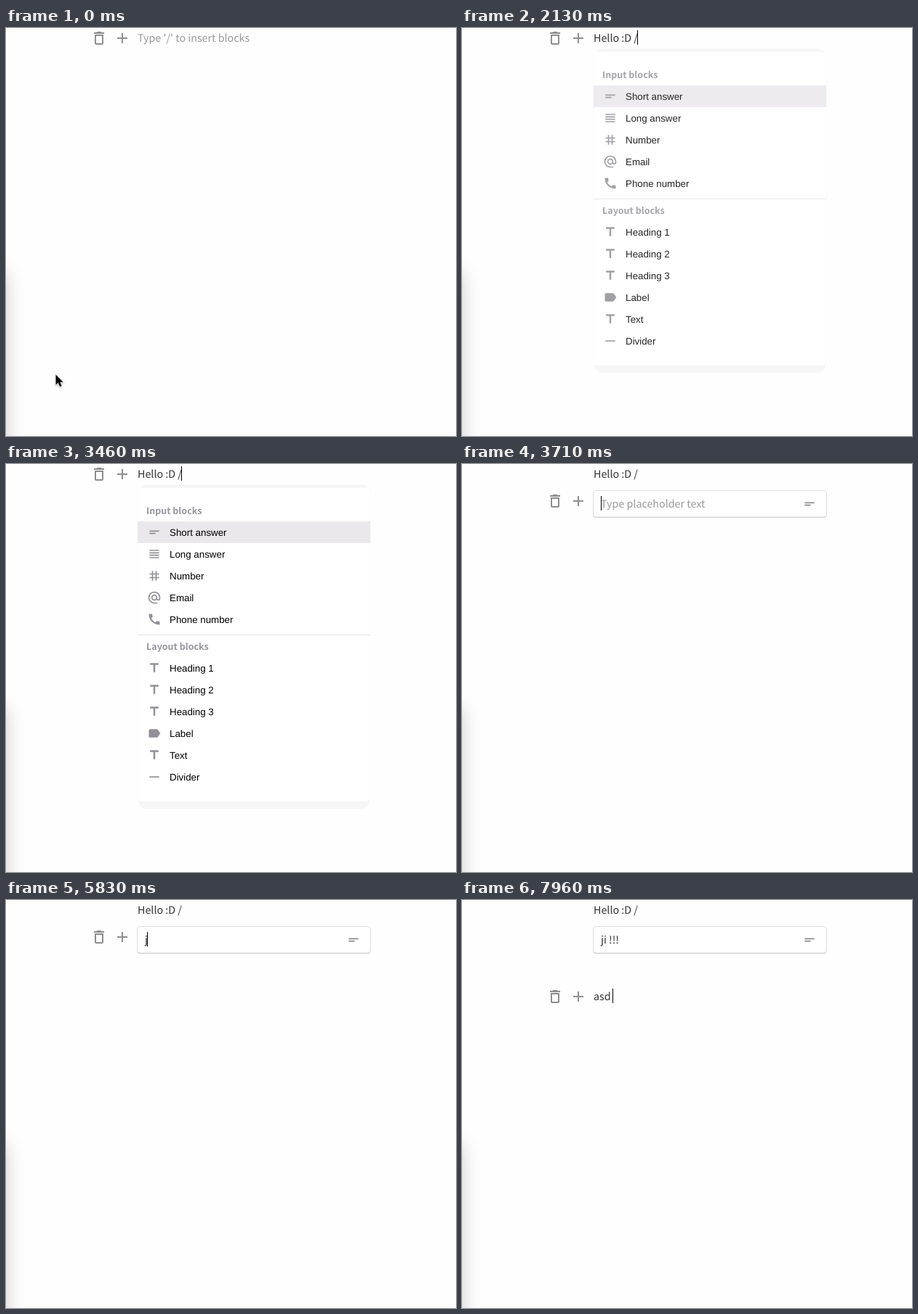
Recreate the animation shown at these times as an HTML page. Size 619x562 px, loop 8 s.

```html
<!DOCTYPE html>
<html lang="en">
<head>
<meta charset="utf-8">
<title>Block editor</title>
<style>
  html, body { margin: 0; width: 100%; height: 100%; overflow: hidden; background: #fefefe; }
  svg { display: block; }
  text { white-space: pre; text-rendering: geometricPrecision; fill: #333; }
  .body, .hint, .head { font: 14.3px "Noto Sans CJK JP", "Noto Sans CJK SC", "Noto Sans CJK", "Open Sans", sans-serif; }
  .hint { fill: #999; }
  .head { font-size: 12.53px; font-weight: 700; fill: #97959c; }
  .item { font: 13.333px "Liberation Sans", Arial, sans-serif; fill: #000; }
  .icon { fill: #8e8e8e; }
  #menu .icon { fill: #929096; }
</style>
</head>
<body>
<svg width="619" height="562" viewBox="0 0 619 562">
  <defs>
    <filter id="soft" filterUnits="userSpaceOnUse" x="-200" y="240" width="300" height="600">
      <feGaussianBlur stdDeviation="13"/>
    </filter>
  </defs>
  <rect x="-150" y="337" width="150" height="400" opacity=".2" filter="url(#soft)"/>

  <g id="tools" class="icon">
    <path transform="translate(116 2)" d="M6 19c0 1.1.9 2 2 2h8c1.1 0 2-.9 2-2V7H6zM8 9h8v10H8zm7.5-5l-1-1h-5l-1 1H5v2h14V4z"/>
    <path transform="translate(148 2)" d="M19 13h-6v6h-2v-6H5v-2h6V5h2v6h6z"/>
  </g>

  <g id="field">
    <rect x="180.5" y="37" width="321" height="37" rx="4" fill="#c4c4c4"/>
    <rect x="180.5" y="36.5" width="321" height="36.5" rx="4" fill="#fff" stroke="#dedede"/>
    <path class="icon" transform="translate(468 45) scale(.8333)" d="M4 9h16v2H4zm0 4h10v2H4z"/>
  </g>

  <g id="lines"></g>

  <g id="menu">
    <rect x="182" y="28" width="318" height="447" rx="12" fill="#f6f6f6"/>
    <rect x="180.5" y="33" width="321" height="432.5" rx="6" fill="#f3f3f3"/>
    <rect x="181" y="33" width="320" height="432" rx="6" fill="#fff"/>
    <g id="content">
      <rect id="mark" x="181" width="320" height="30" fill="#eae8ed"/>
      <path d="M181 235.5h320" stroke="#e4e4e6"/>
      <text class="head" x="193" y="69">Input blocks</text>
      <text class="head" x="193" y="256">Layout blocks</text>
    </g>
  </g>

  <rect id="caret" width="1" height="20" fill="#000"/>
  <path id="mouse" transform="translate(68.5 477.5)" d="M0 0v14l3.2-3 2.3 5.6 2.6-1.1-2.3-5.3h4.4z" stroke="#fff" stroke-width="1.2" paint-order="stroke" style="filter:drop-shadow(0 1px 1px #0005)"/>
</svg>
<script>
const LOOP = 8000;
const $ = id => document.getElementById(id);
const add = (parent, tag, attrs, text = '') => {
  const el = document.createElementNS('http://www.w3.org/2000/svg', tag);
  for (const k in attrs) el.setAttribute(k, attrs[k]);
  el.textContent = text;
  return parent.appendChild(el);
};
const show = (el, on) => el.setAttribute('visibility', on ? 'visible' : 'hidden');

// Menu rows: label, icon path, centre y
const T = 'M5 4v3h5.5v12h3V7H19V4z';
const rows = [
  ['Short answer', 'M4 9h16v2H4zm0 4h10v2H4z', 94],
  ['Long answer', 'M4 5h16v2H4zm0 4h16v2H4zm0 4h16v2H4zm0 4h16v2H4z', 124],
  ['Number', 'M20 10V8h-4V4h-2v4h-4V4H8v4H4v2h4v4H4v2h4v4h2v-4h4v4h2v-4h4v-2h-4v-4zm-6 4h-4v-4h4z', 154],
  ['Email', 'M17 21h-5a9 9 0 1 1 9-9v1.4a2.5 2.5 0 0 1-5 0V12a4 4 0 1 0-4 4 4 4 0 0 0 4-4', 184],
  ['Phone number', 'M20 15.4c-1.2 0-2.4-.2-3.5-.6a1 1 0 0 0-1 .3L13.9 17c-2.8-1.3-5.5-3.9-6.9-6.8l2-1.7a1 1 0 0 0 .2-1c-.4-1.1-.6-2.3-.6-3.5a1 1 0 0 0-1-1H4.2A1 1 0 0 0 3 4c0 9.3 7.7 17 17 17a1 1 0 0 0 1-1.2v-3.4a1 1 0 0 0-1-1z', 214],
  ['Heading 1', T, 281],
  ['Heading 2', T, 311],
  ['Heading 3', T, 341],
  ['Label', 'M17.6 5.8A2 2 0 0 0 16 5H5a2 2 0 0 0-2 2v10a2 2 0 0 0 2 2h11a2 2 0 0 0 1.6-.8L22 12z', 371],
  ['Text', T, 401],
  ['Divider', 'M4 11h16v2H4z', 431]
];
for (const [label, d, y] of rows) {
  const icon = add($('content'), 'path', { class: 'icon', d, transform: `translate(194 ${y - 10}) scale(.8333)` });
  if (label === 'Email') icon.setAttribute('style', 'fill:none;stroke:#929096;stroke-width:2');
  add($('content'), 'text', { class: 'item', x: 225, y: y + 5 }, label);
}

// Editable lines: left edge, baseline, tool offset, placeholder
const hint = "Type '/' to insert blocks";
const lines = [
  [181, 19, 0, hint],
  [191, 60, 37, 'Type placeholder text'],
  [181, 101, 82, hint],
  [181, 138, 119, hint]
].map(([x, y, shift, ph]) => ({
  x, y, shift,
  ph: add($('lines'), 'text', { class: 'hint', x, y }, ph),
  el: add($('lines'), 'text', { class: 'body', x, y })
}));

// Time, active line, its text, caret shown
const steps = [
  [0, 0, '', 0], [250, 0, 'H', 1], [460, 0, 'He', 1], [630, 0, 'Hel', 1], [710, 0, 'Hell', 1],
  [920, 0, 'Hello', 1], [1080, 0, 'Hello ', 1], [1170, 0, 'Hello :', 1], [1420, 0, 'Hello :D', 1],
  [1540, 0, 'Hello :D ', 1], [1630, 0, 'Hello :D ', 0], [2130, 0, 'Hello :D /', 1],
  [2670, 0, 'Hello :D /', 0], [3330, 0, 'Hello :D /', 1],
  [3710, 1, '', 1], [3920, 1, '', 0], [4330, 1, '', 1], [4790, 1, 'j', 1], [5210, 1, 'ji', 1],
  [5580, 1, 'j', 1], [5670, 1, '', 1], [5750, 1, '', 0], [5830, 1, 'j', 1], [6000, 1, 'ji', 1],
  [6080, 1, 'ji ', 1], [6420, 1, 'ji !', 1], [6830, 1, 'ji !!', 1], [6920, 1, 'ji !!!', 1],
  [7130, 2, '', 1], [7420, 3, '', 1],
  [7630, 3, 'a', 1], [7790, 3, 'as', 1], [7870, 3, 'asd', 1], [7960, 3, 'asd ', 1]
];

function draw(now) {
  const t = now % LOOP;
  const past = steps.filter(s => s[0] <= t);
  const [, active, , caretOn] = past[past.length - 1];

  lines.forEach((line, i) => {
    const last = past.filter(s => s[1] === i).pop();
    const text = last ? last[2] : '';
    if (line.el.textContent !== text) line.el.textContent = text;
    show(line.ph, i === active && !text);
  });

  const cur = lines[active];
  const width = cur.el.textContent ? cur.el.getComputedTextLength() : 0;
  $('caret').setAttribute('x', Math.floor(cur.x + width + 0.05));
  $('caret').setAttribute('y', cur.y - 16);
  show($('caret'), caretOn);

  $('tools').setAttribute('transform', `translate(0 ${cur.shift})`);
  show($('field'), active > 0);
  show($('menu'), t >= 2130 && t < 3710);
  $('content').setAttribute('opacity', t < 2500 ? 0.85 : 1);
  $('mark').setAttribute('y', t >= 3130 && t < 3460 ? 109 : 79);
  show($('mouse'), t < 250);
}

function tick() {
  draw(performance.now());
  requestAnimationFrame(tick);
}
tick();
</script>
</body>
</html>
```
